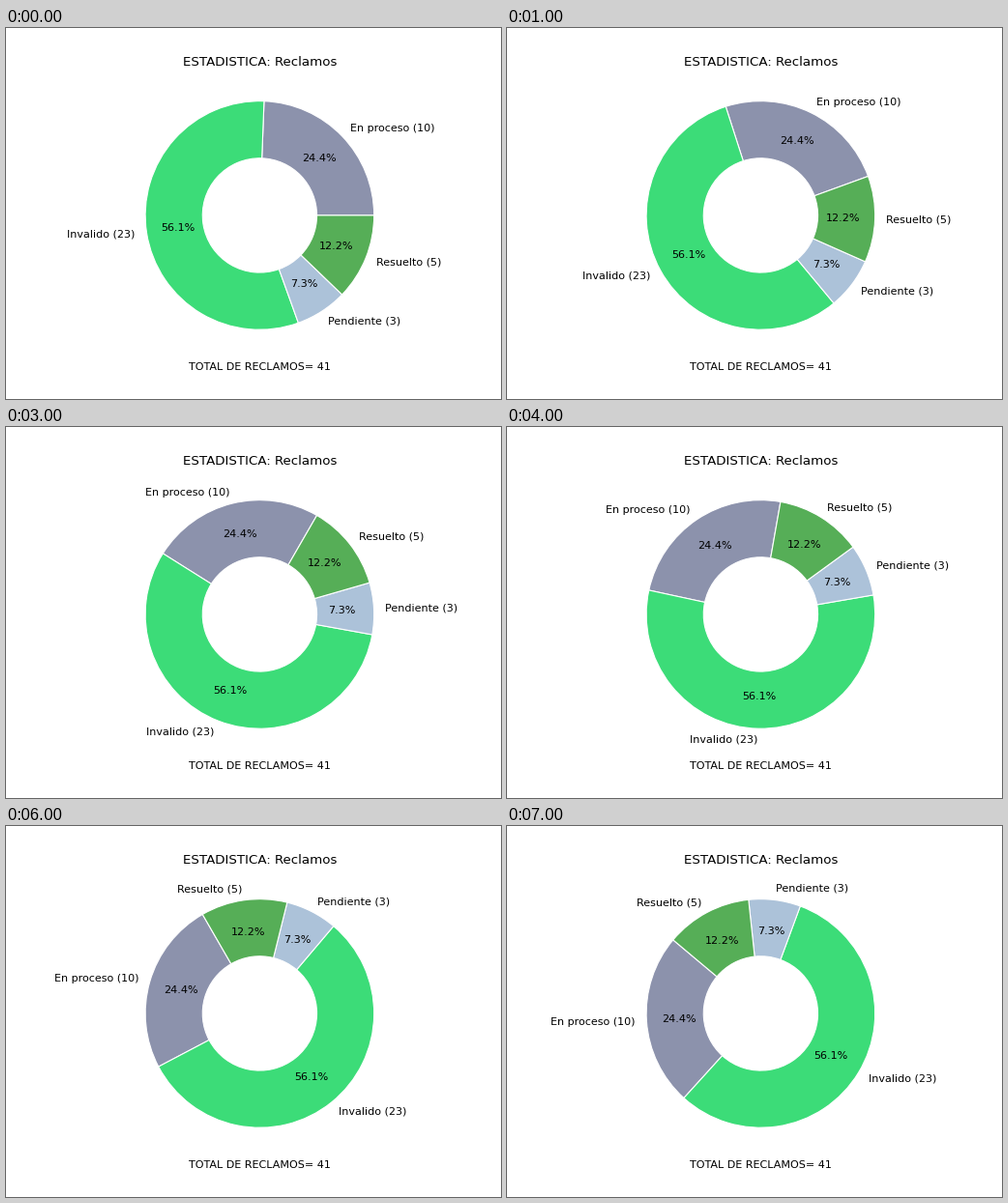
A matplotlib script that plays this animation: 512x384 px, repeating every 8000 ms.

```python
import matplotlib.pyplot as plt
from matplotlib.animation import FuncAnimation

plt.rcParams["font.family"] = "DejaVu Sans"

CLAIMS = {
    "En proceso": (10, "#8C92AC"),
    "Invalido": (23, "#3CDC78"),
    "Pendiente": (3, "#ACC2D9"),
    "Resuelto": (5, "#56AE57"),
}
COUNTS = [count for count, _ in CLAIMS.values()]
COLORS = [color for _, color in CLAIMS.values()]
LABELS = [f"{name} ({count})" for name, (count, _) in CLAIMS.items()]

FRAMES = 8
STEP_MS = 1000
STEP_DEG = 20

fig, ax = plt.subplots(figsize=(6.4, 4.8), dpi=80, facecolor="white")


def draw(i):
    """Redraw the ring, turned one step further counterclockwise."""
    ax.clear()
    ax.pie(
        COUNTS,
        labels=LABELS,
        colors=COLORS,
        autopct="%1.1f%%",
        pctdistance=0.72,
        startangle=STEP_DEG * i,
        wedgeprops={"width": 0.5, "edgecolor": "white", "linewidth": 1},
        textprops={"fontsize": 10},
    )
    ax.set_title("ESTADISTICA: Reclamos", fontsize=12)
    ax.set_xlabel(f"TOTAL DE RECLAMOS= {sum(COUNTS)}", fontsize=10)


anim = FuncAnimation(fig, draw, frames=FRAMES, init_func=lambda: draw(0),
                     interval=STEP_MS, repeat=True)
plt.show()
```
